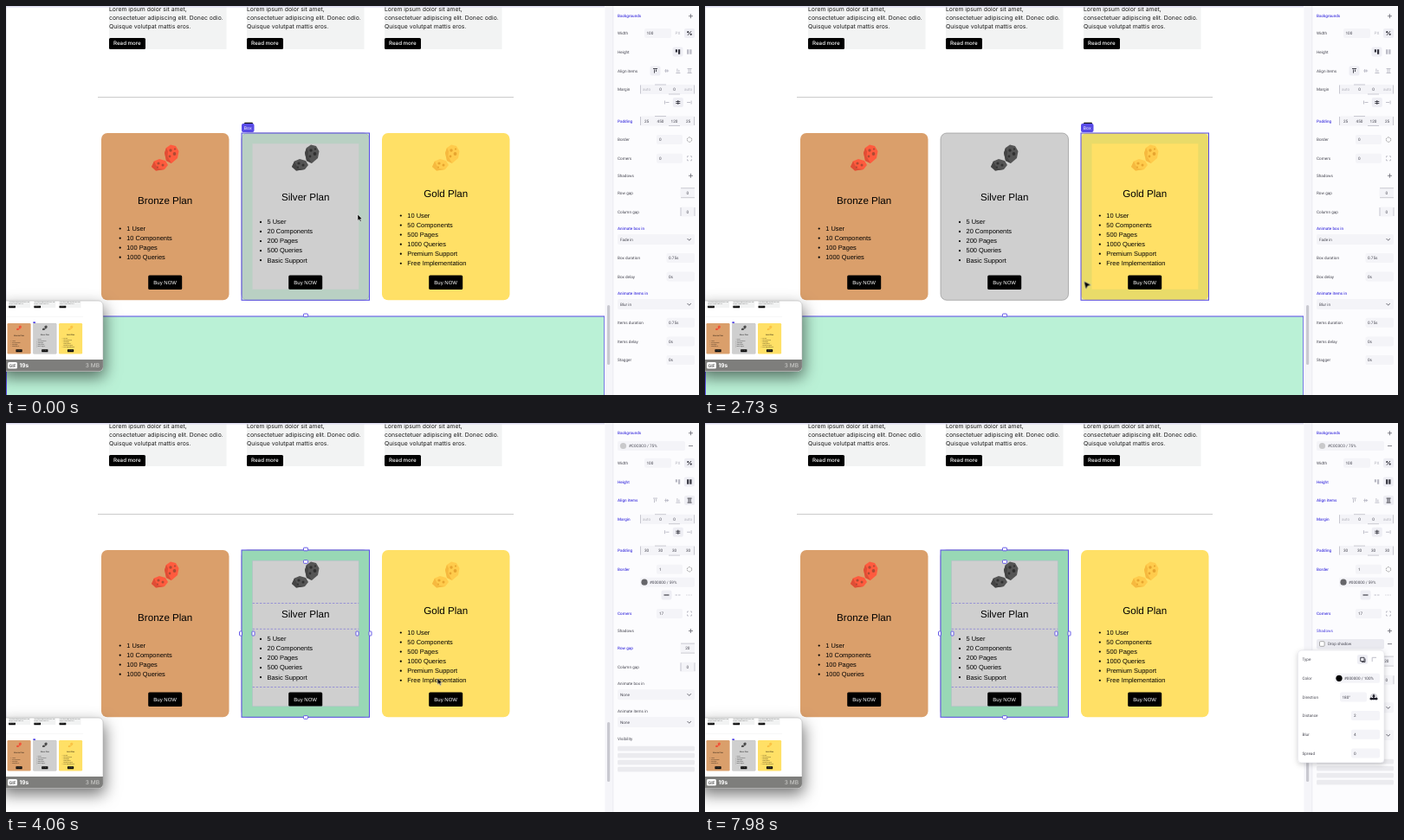
Write an HTML page that moves like this. It is 800x450 px and loops after 8000 ms.

```html
<!DOCTYPE html>
<html lang="en">
<head>
<meta charset="utf-8">
<title>Pricing page editor</title>
<style>
html, body { margin: 0; width: 100%; height: 100%; overflow: hidden; background: #fff; }
svg { display: block; width: 100vw; height: 100vh; }
text { text-rendering: geometricPrecision; white-space: pre; }
.copy { font: 6.85px Inter, sans-serif; fill: #1a1a1a; }
.more { font: 500 6.2px Inter, sans-serif; fill: #fff; }
.title { font: 11.6px "Liberation Sans", sans-serif; text-anchor: middle; }
.item { font: 7.45px "Liberation Sans", sans-serif; }
.buy { font: 6px "Liberation Sans", sans-serif; fill: #fff; text-anchor: middle; }
.ui { font: 4.65px Roboto, sans-serif; fill: #474752; }
.on { fill: #4a3fe0; font-weight: 500; }
.mid { text-anchor: middle; }
.dim { fill: #b4b4be; }
.tag { font: 5px Inter, sans-serif; fill: #fff; text-anchor: middle; }

.t { animation: 8s step-end infinite; }
.before { animation-name: before; }
.after { animation-name: after; }
.silver-hover { animation-name: silverHover; }
.gold-hover { animation-name: goldHover; }
.shadow-row { animation-name: shadowRow; }
.row-dots { animation-name: rowDots; }
.shadow-label { animation-name: shadowLabel; }
.below { animation-name: below; }
.popover { animation-name: popover; }
.arrow { animation-name: arrow; }
.pen { animation-name: pen; }
.hand { animation-name: hand; }
.grip { animation-name: grip; }
@keyframes before { 0% { visibility: visible } 40.6%, 100% { visibility: hidden } }
@keyframes after { 0% { visibility: hidden } 40.6%, 100% { visibility: visible } }
@keyframes silverHover { 0%, 37.8% { visibility: visible } 28%, 40.6%, 100% { visibility: hidden } }
@keyframes goldHover { 0%, 37.8%, 100% { visibility: hidden } 28% { visibility: visible } }
@keyframes shadowRow { 0% { visibility: hidden } 71.2%, 100% { visibility: visible } }
@keyframes rowDots { 0%, 86.9%, 100% { visibility: hidden } 79% { visibility: visible } }
@keyframes shadowLabel { 0% { fill: #474752 } 71.2%, 100% { fill: #4a3fe0 } }
@keyframes below { 0% { transform: none } 71.2%, 100% { transform: translateY(15px) } }
@keyframes popover { 0% { visibility: hidden } 86.9%, 100% { visibility: visible } }
@keyframes arrow { 0%, 50% { visibility: visible } 30%, 78.5%, 100% { visibility: hidden } }
@keyframes pen { 0%, 50%, 100% { visibility: hidden } 30% { visibility: visible } }
@keyframes hand { 0%, 95%, 100% { visibility: hidden } 78.5% { visibility: visible } }
@keyframes grip { 0% { visibility: hidden } 95%, 100% { visibility: visible } }

.cursor { animation: move 8s ease-in-out infinite; }
@keyframes move {
  0%, 1% { transform: translate(406px, 241px) }
  13%, 17% { transform: translate(391px, 419.5px) }
  33%, 34.2% { transform: translate(437.5px, 318.5px) }
  39.5%, 46% { transform: translate(403px, 312px) }
  59.5%, 61.2% { transform: translate(770px, 247px) }
  63.5%, 76% { transform: translate(783.5px, 240.5px) }
  80%, 88% { transform: translate(757px, 259px) }
  97%, 100% { transform: translate(772px, 317px) }
}
.ring { transform-box: fill-box; transform-origin: center; opacity: 0; animation: 8s linear infinite; }
.ring1 { animation-name: ring1; }
.ring2 { animation-name: ring2; }
@keyframes ring1 {
  0%, 40% { opacity: 0; transform: scale(.5) }
  41%, 42.5% { opacity: 1; transform: none }
  45%, 100% { opacity: 0; transform: scale(1.15) }
}
@keyframes ring2 {
  0%, 69.5% { opacity: 0; transform: scale(.5) }
  70.5%, 72% { opacity: 1; transform: none }
  74.3%, 100% { opacity: 0; transform: scale(1.15) }
}
</style>
</head>
<body>
<svg id="stage" viewBox="0 0 800 450" preserveAspectRatio="none"></svg>
<script>
const PURPLE = '#584be6';
const INK = '#33333d';
const PALE = '#b9b9c4';

const text = (s, x, y, cls) => `<text x="${x}" y="${y}" class="${cls}">${s}</text>`;
const rect = (x, y, w, h, fill, r = 0, more = '') =>
  `<rect x="${x}" y="${y}" width="${w}" height="${h}" rx="${r}" fill="${fill}" ${more}/>`;
const line = (d, color = INK, w = .7, more = '') =>
  `<path d="${d}" fill="none" stroke="${color}" stroke-width="${w}" ${more}/>`;
const shape = (d, fill, more = '') => `<path d="${d}" fill="${fill}" ${more}/>`;
const group = (cls, ...parts) => `<g class="${cls}">${parts.join('')}</g>`;
const dot = (x, y, r, fill) => `<circle cx="${x}" cy="${y}" r="${r}" fill="${fill}"/>`;

// Page
function article(x) {
  const lines = ['Lorem ipsum dolor sit amet,', 'consectetuer adipiscing elit. Donec odio.', 'Quisque volutpat mattis eros.'];
  return rect(x, 0, 135.5, 50, '#f2f3f3')
    + lines.map((s, i) => text(s, x, 5.8 + i * 10, 'copy')).join('')
    + rect(x, 37, 42, 13, '#000', 1.5) + text('Read more', x + 5, 45.4, 'more');
}

function rock(x, light, mid, dark) {
  const craters = [[80, 167, 1.7], [84.5, 171, 1.9], [79, 174, 1.4], [85, 165.5, 1.1], [66, 182, 1.6], [71, 184, 1.5], [65, 186.5, 1]];
  return `<g transform="translate(${x} 0)">`
    + shape('M73 170 75 164 80 160.5 86 162 89.5 168 88 176 81 182 75 179Z', light)
    + shape('M73 170 75 164 77 168 76.5 174 81 182 75 179Z', mid)
    + shape('M58 186 61 179.5 67 177 74 179 77 184 73 189 63 190.5Z', light)
    + shape('M58 186 61 179.5 63 184 66 188 73 189 63 190.5Z', mid)
    + craters.map(([cx, cy, r]) => dot(cx, cy, r, dark)).join('') + '</g>';
}

function card(x, fill, name, nameY, listX, listY, items, rocks, more = '') {
  const mid = x + 73.7;
  return rect(x, 147, 147.5, 193.3, fill, 7, more) + rock(x, ...rocks)
    + text(name, mid, nameY, 'title')
    + items.map((s, i) => {
        const y = listY + i * 11.05;
        return dot(listX - 7.5, y + .2, 1.1, '#000') + text(s, listX, y + 2.6, 'item');
      }).join('')
    + rect(mid - 19.5, 311.5, 39, 16.5, '#000', 1.5) + text('Buy NOW', mid, 322, 'buy');
}

const frame = (x, fill, more) =>
  shape(`M${x} 147h147.5v193.3h-147.5zM${x + 12.5} 159.3v168.5h122.8v-168.5z`, fill, `fill-rule="evenodd" ${more}`);
const outline = x => rect(x, 147, 147.5, 193.3, 'none', 0, `stroke="${PURPLE}"`);
const boxTag = x => rect(x + 3, 134.8, 10, 3, '#16161c', 1)
  + rect(x, 136, 14.5, 10, PURPLE, 2) + text('Box', x + 7.2, 142.8, 'tag');
const hover = (x, tint, alpha) => frame(x, tint, `opacity="${alpha}"`) + outline(x) + boxTag(x);
const handle = (x, y, w = 5, h = 3.6) => rect(x - w / 2, y - h / 2, w, h, '#fff', .8, `stroke="${PURPLE}" stroke-width=".9"`);

const cards = card(110, '#da9f6b', 'Bronze Plan', 228.7, 139.2, 257.3,
    ['1 User', '10 Components', '100 Pages', '1000 Queries'], ['#ff5b3e', '#df4d35', '#ad4a33'])
  + card(272, '#cfcfcf', 'Silver Plan', 225.2, 301.5, 249.7,
    ['5 User', '20 Components', '200 Pages', '500 Queries', 'Basic Support'], ['#555', '#444', '#303030'], 'stroke="#888" stroke-width=".6"')
  + card(434, '#ffe066', 'Gold Plan', 221.3, 463.3, 242.3,
    ['10 User', '50 Components', '500 Pages', '1000 Queries', 'Premium Support', 'Free Implementation'], ['#ffcb4c', '#f6b93f', '#e7a52f']);

const page = `<g id="page">${[119, 278, 437].map(article).join('')}${line('M106 105.5H586', '#b5b5b5', .7)}${cards}</g>`;

const selected = frame(272, '#98d8b5', '') + outline(272)
  + [208.5, 238.3, 305.5].map(y => line(`M284.5 ${y}h122.8`, '#7f78d8', .7, 'stroke-dasharray="2.5 1.7"')).join('')
  + line('M284.5 159.3h122.8v168.5h-122.8z', '#aeb5c8', .4)
  + [[346, 146], [346, 160.5], [346, 340.5]].map(([x, y]) => handle(x, y)).join('')
  + [271, 285.5, 405.5, 420.5].map(x => handle(x, 243.5, 3, 5)).join('');

const section = rect(.5, 359, 690.3, 95, '#baf1d6', 0, `stroke="${PURPLE}"`) + handle(346, 357.8);

const thumb = `<g filter="url(#soft)">${rect(-8, 341, 120, 81.5, '#fff', 5)}</g>
  <g clip-path="url(#thumb)">${rect(0, 341, 112, 82, '#fff')}
  <use href="#page" transform="translate(-18.7 340) scale(.1837)"/>
  ${rect(31.3, 365.3, 2.7, 1.8, PURPLE, .4)}${rect(0, 409, 112, 14, '#7e7e7c')}</g>
  ${rect(-8, 341, 120, 81.5, 'none', 5, 'stroke="#a5a5a5" stroke-width=".5"')}
  ${rect(2, 412, 11, 7.5, '#fff', 1.5)}
  <text x="7.5" y="417.6" font-family="Inter, sans-serif" font-weight="700" font-size="5" text-anchor="middle" fill="#666">GIF</text>
  <text x="15.5" y="418.4" font-family="Inter, sans-serif" font-weight="700" font-size="6.6" fill="#fff">19s</text>
  <text x="108" y="418.4" font-family="Inter, sans-serif" font-size="6.6" text-anchor="end" fill="#d5d5d3">3 MB</text>`;

// Side panel: y is always the middle of a row
const label = (s, y, on) => text(s, 706, y + 1.65, on ? 'ui on' : 'ui');
const value = (s, x, y, cls = '') => text(s, x, y + 1.65, 'ui ' + cls);
const field = (x, y, w, s, dx = 3, fill = '#f4f4f8') => rect(x, y - 5.5, w, 11, fill, 2) + value(s, x + dx, y);
const plus = y => line(`M788 ${y}h5M790.5 ${y - 2.5}v5`, '#555560');
const minus = y => line(`M788 ${y}h5`, '#555560');
const icon = (x, y, d, on, w = .9) => (on ? rect(x - 6, y - 5.5, 12, 11, '#eeeef4', 2) : '')
  + `<g transform="translate(${x} ${y})">${line(d, on ? INK : PALE, w)}</g>`;
const chevron = y => line(`M786.5 ${y - 1}l2.2 2.2 2.2-2.2`, '#444450', .8);
const select = (s, y) => rect(706, y - 6, 89, 12, '#f4f4f8', 2) + value(s, 709, y) + chevron(y);

const widthRow = y => label('Width', y) + field(737, y, 31, '100', 2.5)
  + value('PX', 775.5, y, 'dim mid') + rect(783, y - 5.5, 12, 11, '#eeeef4', 2)
  + line(`M787 ${y + 2.3}l4-4.6`, INK, .9) + dot(787.3, y - 1.3, 1.1, INK) + dot(790.7, y + 1.3, 1.1, INK);

const heightRow = (y, full) => label('Height', y, full)
  + icon(775.5, y, 'M-1.6-2.8v3.2M1.6-2.8v5.6', !full, 2.2) + icon(788.8, y, 'M-1.6-2.8v5.6M1.6-2.8v5.6', full, 2.2);

const alignRow = (y, active) => label('Align items', y, active === 3)
  + ['M-2.5-2.5h5M-1-1.5v4M1-1.5v2.5', 'M-2.5 0h5M-1-2v4M1-1.5v3', 'M-2.5 2.5h5M-1-2.5v4M1-1v2.5', 'M-2.5-2.5h5M-2.5 2.5h5M-1-2v4M1-2v4']
    .map((d, i) => icon(749.5 + i * 13.2, y, d, i === active)).join('');

function sides(name, y, vals, on) {
  return label(name, y, on) + rect(732, y - 5.5, 63, 11, '#f4f4f8', 2)
    + line(`M732.5 ${y - 5}v10M794.5 ${y - 5}v10M749 ${y - 5.5}h13M765 ${y + 5.5}h13`, '#a9a9b6', .6)
    + vals.map((v, i) => value(v, 739.5 + i * 16, y, v === 'auto' ? 'mid dim' : 'mid')).join('');
}
const marginRow = (y, on) => sides('Margin', y, ['auto', '0', '0', 'auto'], on)
  + ['M-2.5-2v4M-1.5 0h4', 'M0-2.5v5M-2.5-1h5M-2.5 1h5', 'M2.5-2v4M1.5 0h-4'].map((d, i) => icon(763 + i * 12.8, y + 15, d, i === 1)).join('');

const borderRow = (y, v, on) => label('Border', y, on) + field(751, y, 30, v)
  + `<circle cx="789" cy="${y}" r="2.7" fill="none" stroke="#777" stroke-width=".7" stroke-dasharray="2 .8"/>`;
const cornerRow = (y, v, on) => label('Corners', y, on) + field(751, y, 30, v)
  + icon(789, y, 'M-2.5-1v-1.5h1.5M1-2.5h1.5v1.5M2.5 1v1.5h-1.5M-1 2.5h-1.5v-1.5', false);
const gapRow = (s, y, v, on) => label(s, y, on) + rect(778.5, y - 5.5, 16.5, 11, '#f4f4f8', 2)
  + line(s === 'Row gap' ? `M779 ${y - 5.5}h16M779 ${y + 5.5}h16` : `M779 ${y - 5}v10M795 ${y - 5}v10`, '#a9a9b6', .6) + value(v, 786.8, y, 'mid');
const timeRow = (s, y, v) => label(s, y) + field(762.5, y, 32.5, v, 2.5);

const sectionPanel = [
  label('Backgrounds', 11.7, 1), plus(11.7), widthRow(31.5), heightRow(53, false), alignRow(75, 0),
  marginRow(96.5), sides('Padding', 133, [25, 450, 120, 25], 1),
  borderRow(154.6, '0'), cornerRow(176.3, '0'), label('Shadows', 196.3), plus(196.3),
  gapRow('Row gap', 216.2, '0'), gapRow('Column gap', 238, '0'),
  label('Animate box in', 257.3, 1), select('Fade in', 270),
  timeRow('Box duration', 291.5, '0.75s'), timeRow('Box delay', 313, '0s'),
  label('Animate items in', 332.2, 1), select('Blur in', 345),
  timeRow('Items duration', 366.3, '0.75s'), timeRow('Items delay', 388, '0s'), timeRow('Stagger', 409.6, '0s')
];

const boxPanel = [
  label('Backgrounds', 11.7, 1), plus(11.7), rect(706, 21, 78, 11, '#f4f4f8', 2), dot(712.5, 26.5, 3.6, '#c9c9cb'),
  value('#C0C0C0 / 75%', 719, 26.5), minus(26.5),
  widthRow(46.3), heightRow(68, true), alignRow(89.6, 3), marginRow(111.2, 1),
  sides('Padding', 147.6, [30, 30, 30, 30], 1), borderRow(169.3, '1', 1),
  rect(732, 178.7, 63, 11, '#f4f4f8', 2), dot(737, 184.2, 3.6, '#66666a'), value('#000000 / 59%', 743, 184.2),
  icon(762.5, 199, 'M-3 0h6', true, 1.1), icon(775.5, 199, 'M-3 0h2.5M.5 0h2.5', false), icon(788.5, 199, 'M-3 0h1M-.5 0h1M2 0h1', false),
  cornerRow(220.5, '17', 1),
  text('Shadows', 706, 242.15, 'ui t shadow-label'), plus(240.5)
];

const shadowRow = rect(706, 250, 78, 11.5, '#eaeaf0', 2)
  + rect(709.5, 252.7, 5.6, 5.6, '#fff', 1, 'stroke="#888" stroke-width=".7"')
  + value('Drop shadow', 719, 255.6) + minus(255.6)
  + group('t row-dots', [775.5, 777.5, 779.5].map(x => dot(x, 255.6, .6, INK)).join(''));

const lower = [
  gapRow('Row gap', 260.6, '20', 1), gapRow('Column gap', 282.2, '0'),
  label('Animate box in', 301.5), select('None', 314.2), label('Animate items in', 333.3), select('None', 346),
  label('Visibility', 365.2), ...[374, 382, 390, 398].map(y => rect(706, y - .2, 89, 5.6, '#ebebef', 1.5))
];

const popRow = (s, y) => text(s, 689.5, y + 1.65, 'ui');
const popField = (s, y, v) => popRow(s, y) + field(746, y, 33, v);
const popover = [
  `<g filter="url(#lift)">${rect(684.5, 263, 99.5, 130, '#fff', 4)}</g>`,
  rect(684.5, 263, 99.5, 130, 'none', 4, 'stroke="#dcdce4" stroke-width=".5"'),
  popRow('Type', 273.6), icon(759, 273.6, 'M-2.3-2.3h4.3v4.3h-4.3zM3 -1v4h-4', true), icon(772.5, 273.6, 'M-2.3 2.5v-4.8h4.8', false),
  popRow('Color', 295.3), rect(727, 289.8, 52, 11, '#f4f4f8', 2), dot(732, 295.3, 3.6, '#000'), value('#000000 / 100%', 738, 295.3),
  popRow('Direction', 317), field(733, 317, 31, '180°', 2.5),
  `<circle cx="772" cy="317" r="3.6" fill="#f4f4f8" stroke="#9a9aa6" stroke-width=".6"/>`,
  popField('Distance', 338.6, '2'), popField('Blur', 360.2, '4'), popField('Spread', 382, '0')
];

const cursor = [
  group('t arrow', shape('M0 0V7.4L1.7 5.8 3 8.6 4.2 8 3 5.4H5.2Z', '#000', 'stroke="#fff" stroke-width=".5"')),
  group('t pen', shape('M0 0 8.2 4.2 4.2 5.4 2.2 9.3Z', '#000', 'stroke="#fff" stroke-width=".4"')),
  group('t hand', shape('M-.8 .4C-.5-.8 .8-.6 1 .5L1.8 4 6.8 5Q8 5.5 7.6 7.5L6.8 11.3H1.5L-1.8 7.3Q-2-.0 6-.4 5.6Z'.replace('Q-2-.0 6-.4 5.6', 'Q-2.2 5.6 .3 6.4'), '#fff', 'stroke="#111" stroke-width=".8" stroke-linejoin="round"')),
  group('t grip', shape('M0-3.6 2-.6H.8V1H2.6V0L5 2 2.6 4V3H-2.6V4L-5 2-2.6 0V1H-.8V-.6H-2Z', '#1c1c26'))
];
const ring = (cls, x, y) => `<circle class="ring ${cls}" cx="${x}" cy="${y}" r="12" fill="#4b8fe0" fill-opacity=".1" stroke="#4f90de" stroke-width="1.8"/>`;

document.getElementById('stage').innerHTML = `<defs>
  <clipPath id="thumb">${rect(-8, 341, 120, 81.5, '#fff', 5)}</clipPath>
  <filter id="soft" x="-50%" y="-50%" width="200%" height="200%"><feDropShadow dx="2" dy="7" stdDeviation="9" flood-color="#000" flood-opacity=".55"/></filter>
  <filter id="lift" x="-20%" y="-20%" width="140%" height="140%"><feDropShadow dx="0" dy="2" stdDeviation="3" flood-color="#000" flood-opacity=".2"/></filter>
  </defs>`
  + rect(0, 0, 800, 450, '#fff') + page
  + group('t before', section)
  + group('t silver-hover', hover(272, '#aed2bd', .65))
  + group('t gold-hover', hover(434, '#d8d86c', .55))
  + group('t after', selected)
  + line('M0 .8H691', '#dddcf0', 1.4) + line('M.3 0V358', '#d5d5e6', .6)
  + thumb
  + rect(691, 0, 109, 450, '#fcfcfe') + rect(691.5, 0, 9, 450, '#f5f5f9') + line('M700.8 0V450', '#dfdfe8', .6)
  + rect(694, 346, 3.2, 69, '#c9c9d0', 1.6)
  + group('t before', ...sectionPanel)
  + group('t after', ...boxPanel, group('t below', ...lower))
  + group('t shadow-row', shadowRow)
  + group('t popover', ...popover)
  + ring('ring1', 402, 312) + ring('ring2', 785, 240.5)
  + group('cursor', ...cursor);
</script>
</body>
</html>
```
